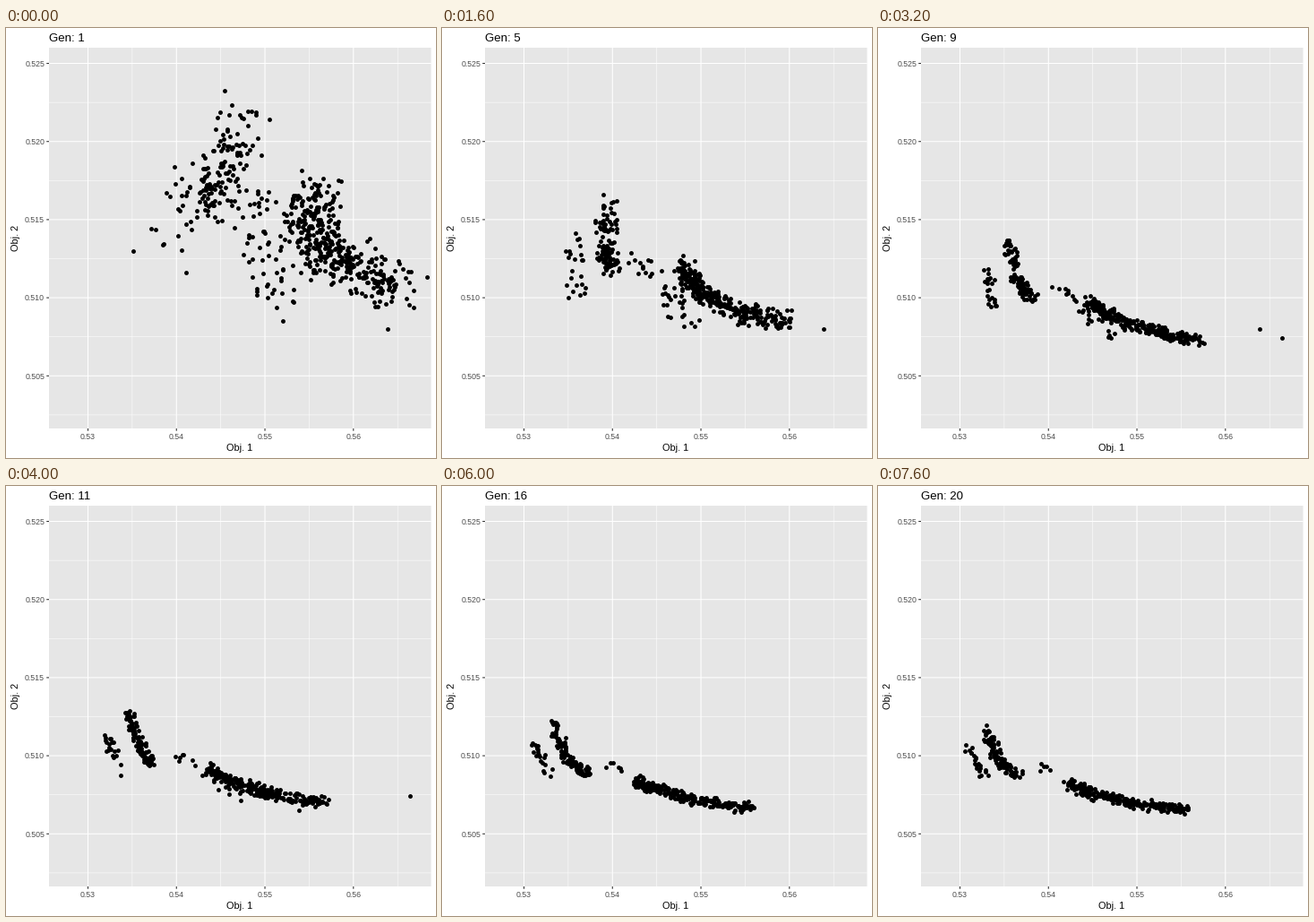
Animation of 480x480 px, one loop 8000 ms. Source, as a matplotlib script:

```python
import numpy as np
import matplotlib.pyplot as plt
from matplotlib.animation import FuncAnimation
from matplotlib.patches import Rectangle

SIZE, DPI = 480, 72  # one point equals one pixel
LEFT, RIGHT, TOP, BOTTOM = 48, 474.5, 22, 447
GENERATIONS, STEP_MS = 20, 400

plt.rcParams["font.family"] = "Liberation Sans"
plt.rcParams["path.snap"] = False

# Each cloud follows a quadratic curve that drifts from a first to a final shape:
# (first count, final count), first control points, final control points
CLOUDS = [
    ((130, 105), [(265, 95), (243, 170), (222, 200)], [(117, 275), (132, 322), (158, 326)]),
    ((22, 22), [(210, 165), (190, 215), (185, 260)], [(98, 294), (104, 300), (118, 330)]),
    ((20, 5), [(250, 180), (265, 205), (285, 225)], [(180, 318), (190, 320), (205, 322)]),
    ((400, 240), [(345, 180), (318, 265), (440, 285)], [(207, 334), (255, 356), (342, 363)]),
    ((45, 8), [(290, 200), (290, 260), (305, 310)], [(208, 338), (230, 345), (255, 355)]),
]
# Long-lived outliers: x, y, first and last generation alive
OUTLIERS = [(142, 249, 1, 7), (455, 312, 1, 4), (426, 336, 1, 9),
            (451, 346, 9, 12), (327, 362, 11, 17), (435, 348, 14, 14)]


def cloud_points(gen, counts, first, final, rng):
    """Scatter points about a curve that converges exponentially."""
    progress = 1 - np.exp(-(gen - 1) / 5)
    spread = 3 + 12 * np.exp(-(gen - 1) / 3)
    first, final = np.array(first), np.array(final)
    p0, p1, p2 = first + (final - first) * progress
    n = round(counts[0] + (counts[1] - counts[0]) * progress)
    u = rng.random((n, 1))
    curve = (1 - u) ** 2 * p0 + 2 * u * (1 - u) * p1 + u ** 2 * p2
    return curve + np.clip(rng.normal(size=(n, 2)), -2, 2) * spread


def x_pixel(value):
    return 91.5 + (value - 0.53) * 9877


def y_pixel(value):
    return 388.3 - (value - 0.505) * 17440


fig = plt.figure(figsize=(SIZE / DPI, SIZE / DPI), dpi=DPI, facecolor="white")
ax = fig.add_axes([0, 0, 1, 1])
ax.set(xlim=(0, SIZE), ylim=(SIZE, 0))
ax.axis("off")
ax.add_patch(Rectangle((LEFT, TOP), RIGHT - LEFT, BOTTOM - TOP, color="#e6e6e6", lw=0))


def line(xs, ys, color="white", width=1.07):
    ax.plot(xs, ys, color=color, lw=width, solid_capstyle="butt", zorder=2)


def label(x, y, text, size, color="black", **kw):
    return ax.text(x, y, text, fontsize=size, color=color, va="baseline",
                   rotation_mode="anchor", **kw)


for i in range(4):
    line([x_pixel(0.535 + i * 0.01)] * 2, [TOP, BOTTOM], width=0.53)
for i in range(5):
    line([LEFT, RIGHT], [y_pixel(0.5025 + i * 0.005)] * 2, width=0.53)
for i in range(4):
    value = 0.53 + i * 0.01
    x = x_pixel(value)
    line([x, x], [TOP, BOTTOM])
    line([x, x], [BOTTOM, BOTTOM + 2.75], "#333333")
    label(x, 459, f"{value:.2f}", 8.8, "#4d4d4d", ha="center")
for i in range(5):
    value = 0.505 + i * 0.005
    y = y_pixel(value)
    line([LEFT, RIGHT], [y, y])
    line([LEFT - 2.75, LEFT], [y, y], "#333333")
    label(43, y + 3.2, f"{value:.3f}", 8.8, "#4d4d4d", ha="right")

label(261, 472, "Obj. 1", 11, ha="center")
label(14.2, 234.5, "Obj. 2", 11, ha="center", rotation=90)
title = label(LEFT, 15, "", 13.2)
dots, = ax.plot([], [], "o", color="black", ms=4.9, mew=0, zorder=3)


def draw(frame):
    gen = frame + 1
    rng = np.random.default_rng(100 + gen)
    points = [cloud_points(gen, *cloud, rng) for cloud in CLOUDS]
    points += [[(x, y)] for x, y, born, died in OUTLIERS if born <= gen <= died]
    dots.set_data(*np.vstack(points).T)
    title.set_text(f"Gen: {gen}")
    return dots, title


animation = FuncAnimation(fig, draw, frames=GENERATIONS, interval=STEP_MS,
                          init_func=lambda: draw(0), repeat=True, repeat_delay=0)
plt.show()
```
